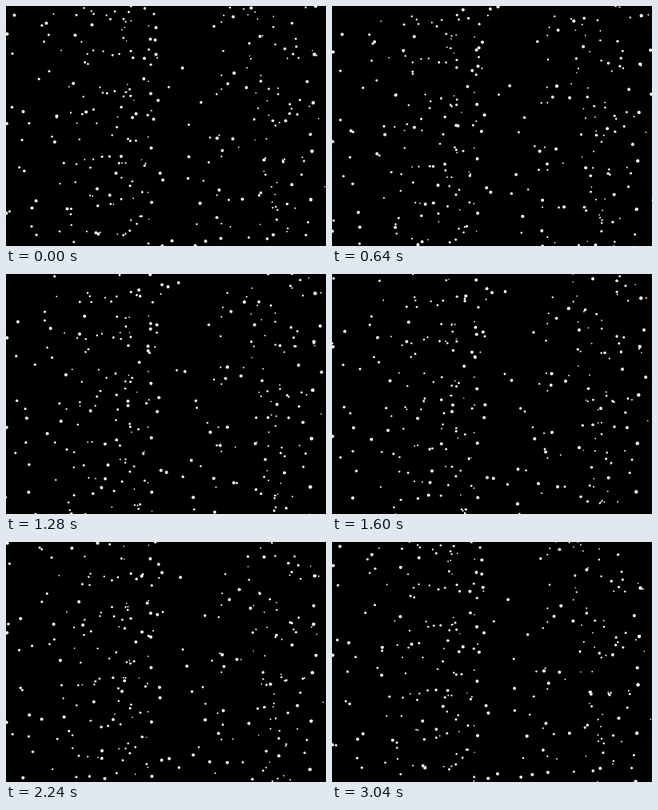
Animation of 400 by 300 pixels, one loop 3200 ms. Source, as an HTML page with a canvas:

```html
<!DOCTYPE html>
<html lang="en">
<head>
<meta charset="utf-8">
<title>Snowfall</title>
<style>
  html, body { margin: 0; width: 100%; height: 100%; overflow: hidden; background: #000; }
  canvas { display: block; }
</style>
</head>
<body>
<canvas id="stage" width="400" height="300"></canvas>
<script>
const LOOP = 3200, STEP = 160, W = 400, H = 300, MARGIN = 4;
const ctx = document.getElementById('stage').getContext('2d');

// Each stream is a straight line of flakes; in one loop every flake
// reaches the place of the next: x, y, dx, dy, radius.
const streams = [
  [10, 11, 11, 120.5, 2], [1, 34.5, -0.5, 112, 2], [107, 23, -23.3, 73.3, 2],
  [86, 36, 13.7, 96, 2], [50, 21, 13, 116, 2], [186, 42, -14.2, 48.5, 1.9],
  [187, 26.5, 2.6, 91, 2], [385, 60, -1.5, 60.5, 2.2], [220, 77, 8, 111, 1.9],
  [283.5, 13, -6.8, 83.6, 1.9], [259.5, 25, -16.2, 95, 1.7], [306, 2, -21.3, 81.4, 2.1],
  [376, 94, -27, 49, 2], [380, 160, -23.2, 62.8, 2], [318, 93.5, 4, 98.5, 1.8],
  [180, 41, 0.5, 68, 2], [187, 60, -25, 74.3, 2], [317, 37.5, -17, 64, 2],
  [172.5, 65, 11.5, 76, 2], [7, 126, 15.3, 79.8, 1.7], [348, 53, -15, 90, 1.8],
  [203, 101, 25, 47, 1.4], [7.5, 59, 12, 108, 1.6], [357, 21, -3, 113, 1.7],
  [173, 2.5, -14.7, 61.7, 1.7], [130, 16, 2.7, 45, 1.4]
];

let seed = 29;
function random(min, max) {
  seed = (seed * 16807) % 2147483647;
  return min + (max - min) * seed / 2147483647;
}

// Finer background streams, densest in the middle and on the right.
const bands = [[15, 130], [132, 195], [258, 335], [320, 394]];
for (let i = 0; i < 44; i++) {
  const [left, right] = bands[i % bands.length];
  const dy = random(45, 120);
  const reach = Math.min(24, (right - left) / 5);
  streams.push([
    random(left, right), random(100, 200),
    random(-reach, reach) * dy / 100, dy, random(0.75, 1.6)
  ]);
}

function drawStream([x, y, dx, dy, radius], progress) {
  const first = Math.ceil((-MARGIN - y) / dy - progress);
  const last = Math.floor((H + MARGIN - y) / dy - progress);
  for (let k = first; k <= last; k++) {
    const n = k + progress;
    ctx.beginPath();
    ctx.arc(x + dx * n + 0.5, y + dy * n + 0.5, radius, 0, Math.PI * 2);
    ctx.fill();
  }
}

const start = performance.now();
function draw() {
  const elapsed = (performance.now() - start) % LOOP;
  const progress = Math.floor(elapsed / STEP) * STEP / LOOP;
  ctx.fillStyle = '#000';
  ctx.fillRect(0, 0, W, H);
  ctx.fillStyle = '#fff';
  for (const stream of streams) drawStream(stream, progress);
  requestAnimationFrame(draw);
}
draw();
</script>
</body>
</html>
```
